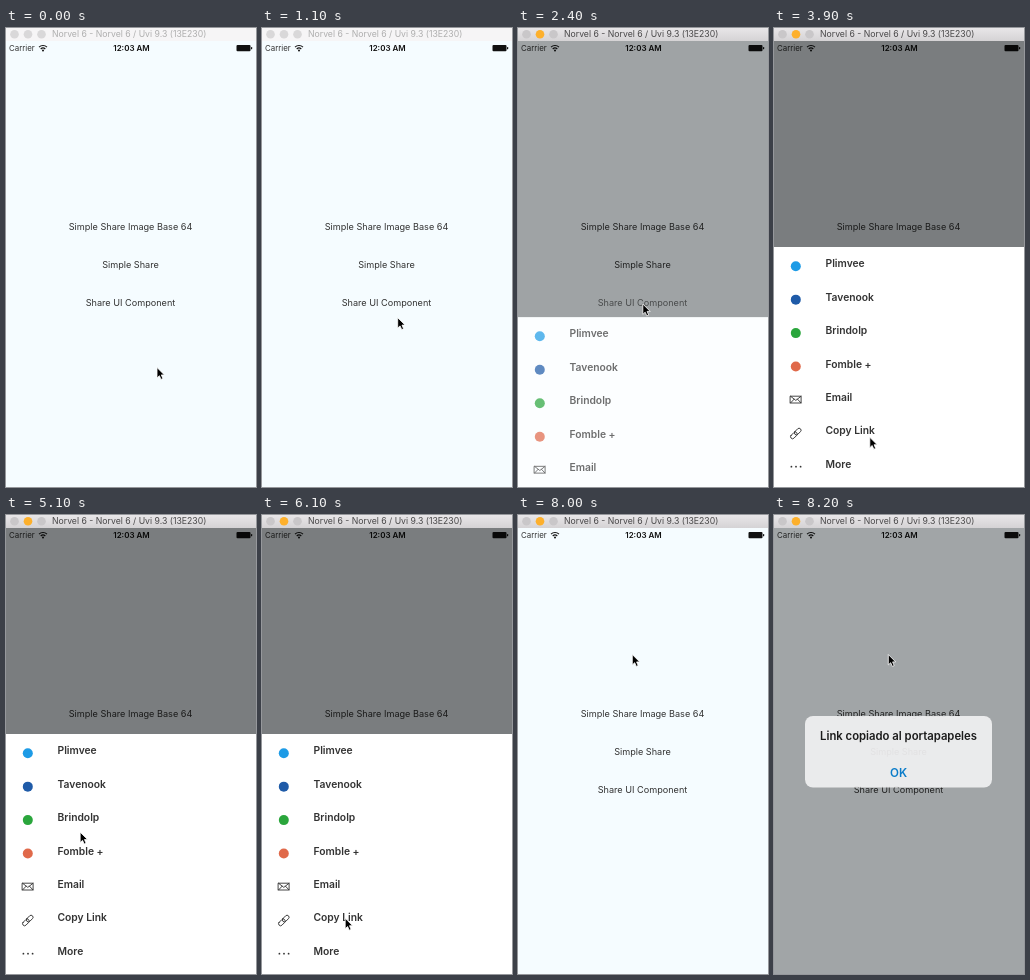
Write an HTML page that moves like this. It is 250x459 px and loops after 8.3 s.

```html
<!DOCTYPE html>
<html lang="en">
<head>
<meta charset="utf-8">
<title>Share sheet demo</title>
<style>
  html, body { margin: 0; width: 100%; height: 100%; overflow: hidden; background: #f5fcff; }
  svg { display: block; width: 250px; height: 459px; }
  text { font-family: Inter, "Open Sans", sans-serif; fill: #333; }
  .mid { text-anchor: middle; }
  .button { font-size: 9.15px; }
  .item { font-size: 10.3px; font-weight: 600; }
  .line { fill: none; stroke: #333; stroke-width: .9; stroke-linecap: round; stroke-linejoin: round; }
</style>
</head>
<body>
<svg viewBox="0 0 250 459" xmlns="http://www.w3.org/2000/svg">
  <defs>
    <linearGradient id="barFill" x2="0" y2="1">
      <stop stop-color="#e8e6e8"/><stop offset="1" stop-color="#d5d3d5"/>
    </linearGradient>
  </defs>
  <rect width="250" height="459" fill="#f5fcff"/>

  <g fill="#111">
    <text x="3" y="23.2" font-size="7.9">Carrier</text>
    <g fill="none" stroke="#111" stroke-width="1.1">
      <path d="M33 19.1a5.7 5.7 0 0 1 8 0M34.7 21a3.3 3.3 0 0 1 4.6 0"/>
    </g>
    <circle cx="37" cy="22.6" r="1"/>
    <text class="mid" x="125.5" y="23.2" font-size="8" font-weight="600" style="fill:#111">12:03 AM</text>
    <rect x="230.5" y="17" width="14" height="6.2" rx="1"/>
    <rect x="245" y="18.9" width="1.2" height="2.4" rx=".5"/>
  </g>

  <text class="button mid" x="124.5" y="201.6">Simple Share Image Base 64</text>
  <text class="button mid" x="124.5" y="239.8">Simple Share</text>
  <text class="button mid" x="124.5" y="278" id="press">Share UI Component</text>

  <rect id="shade" y="13" width="250" height="446"/>

  <g id="sheet">
    <rect id="sheetBack" y="219" width="250" height="240"/>
    <g id="items">
      <g class="line">
        <path d="M16.5 368.2h10.6v6.8h-10.6zl5.3 4.2 5.3-4.2M16.5 375l3.7-3.9M27.1 375l-3.7-3.9"/>
        <g transform="translate(21.8 405.5) rotate(-45)">
          <rect x="-6.6" y="-2" width="7.8" height="4" rx="2"/>
          <rect x="-1.2" y="-2" width="7.8" height="4" rx="2"/>
        </g>
      </g>
      <g fill="#333">
        <circle cx="17.4" cy="438.7" r=".9"/><circle cx="22" cy="438.7" r=".9"/><circle cx="26.6" cy="438.7" r=".9"/>
      </g>
    </g>
  </g>

  <g id="alert">
    <rect x="31" y="201" width="187" height="71.5" rx="8" fill="#f0f0f1" fill-opacity=".93"/>
    <text class="mid" x="124.5" y="225.4" font-size="11.3" font-weight="600" style="fill:#1b1b1b">Link copiado al portapapeles</text>
    <text class="mid" x="124.5" y="261.8" font-size="11.6" font-weight="600" style="fill:#0a7cc9">OK</text>
  </g>

  <rect id="bar" width="250" height="13"/>
  <circle class="dot" cx="8.5" cy="6.2" r="4.3"/>
  <circle class="dot" cx="22" cy="6.2" r="4.3"/>
  <circle class="dot" cx="35.5" cy="6.2" r="4.3"/>
  <text id="title" x="46" y="9.4" font-size="8.7">Norvel 6 - Norvel 6 / Uvi 9.3 (13E230)</text>

  <path id="cursor" d="M0 0V10.4L2.4 8.2 4 11.9 5.9 11.1 4.3 7.4H7.4Z" fill="#000" stroke="#fff" stroke-width=".8" stroke-linejoin="round"/>
</svg>
<script>
const LOOP = 8300, STEP = 100;
const $ = id => document.getElementById(id);
const set = (el, attrs) => { for (const k in attrs) el.setAttribute(k, attrs[k]); };
const add = (name, attrs) => {
  const el = document.createElementNS("http://www.w3.org/2000/svg", name);
  set(el, attrs);
  return $("items").appendChild(el);
};
const ramp = (t, a, b) => Math.min(1, Math.max(0, (t - a) / (b - a)));
const mix = (a, b, p) => a + (b - a) * p;
const smooth = p => p * p * (3 - 2 * p);

const labels = ["Plimvee", "Tavenook", "Brindolp", "Fomble +", "Email", "Copy Link", "More"];
const tints = ["#1d9be6", "#1f5ba8", "#2aa63c", "#e0694a"];
labels.forEach((label, i) => {
  const y = 239.2 + i * 33.45;
  add("text", { class: "item", x: 51.5, y }).textContent = label;
  if (tints[i]) add("circle", { cx: 21.8, cy: y - 1, r: 5, fill: tints[i] });
});

// time, x, y of the pointer tip
const track = [
  [0, 151, 339.5], [600, 139.5, 294.5], [800, 139.5, 294.5], [1700, 124.8, 276],
  [3100, 124.8, 276], [3900, 95.8, 409.3], [4100, 95.8, 409.3], [4500, 83.5, 404.5],
  [4600, 83.5, 404.5], [4700, 83.2, 403.3], [4900, 83.2, 403.3], [5200, 71, 287],
  [5300, 71, 287], [6100, 83.2, 403.3], [6300, 83.2, 403.3], [6500, 83.2, 379.5],
  [6800, 73, 253], [6900, 73, 253], [7500, 114.3, 139.5], [LOOP, 114.3, 139.5]
];

function pointer(t) {
  const i = track.findIndex(k => k[0] > t);
  const a = track[i - 1], b = track[i], p = smooth(ramp(t, a[0], b[0]));
  return [mix(a[1], b[1], p), mix(a[2], b[2], p)];
}

function sheetAmount(t) {
  if (t < 4000) return 1 - (1 - ramp(t, 2230, 2600)) ** 2;
  return (1 - ramp(t, 6360, 6800)) ** 2;
}

function draw(t) {
  const active = t >= 2000;
  set($("bar"), { fill: active ? "url(#barFill)" : "#f6f5f6" });
  $("title").style.fill = active ? "#484748" : "#aeaeae";
  document.querySelectorAll(".dot").forEach((dot, i) =>
    set(dot, { fill: !active ? "#d9d8d9" : i === 1 ? "#fdb02c" : "#c9c7c9" }));

  const held = ramp(t, 1900, 2100) - ramp(t, 2250, 2500);
  set($("press"), { opacity: 1 - .8 * held });

  const open = sheetAmount(t), pop = ramp(t, 8000, 8200);
  set($("shade"), { opacity: Math.max(.5 * open, .345 * pop) });
  set($("sheet"), {
    transform: `translate(0 ${240 * (1 - open)})`,
    visibility: open > 0 ? "visible" : "hidden"
  });
  set($("sheetBack"), { fill: `rgb(${mix(245, 255, open)}, ${mix(252, 255, open)}, 255)` });
  set($("items"), { opacity: open });

  const scale = mix(1.16, 1, pop);
  set($("alert"), {
    opacity: pop,
    transform: `translate(124.5 236.5) scale(${scale}) translate(-124.5 -236.5)`
  });
  set($("cursor"), { transform: `translate(${pointer(t)})` });
}

function tick() {
  const t = performance.now() % LOOP;
  draw(Math.floor(t / STEP) * STEP);
  requestAnimationFrame(tick);
}
tick();
</script>
</body>
</html>
```
